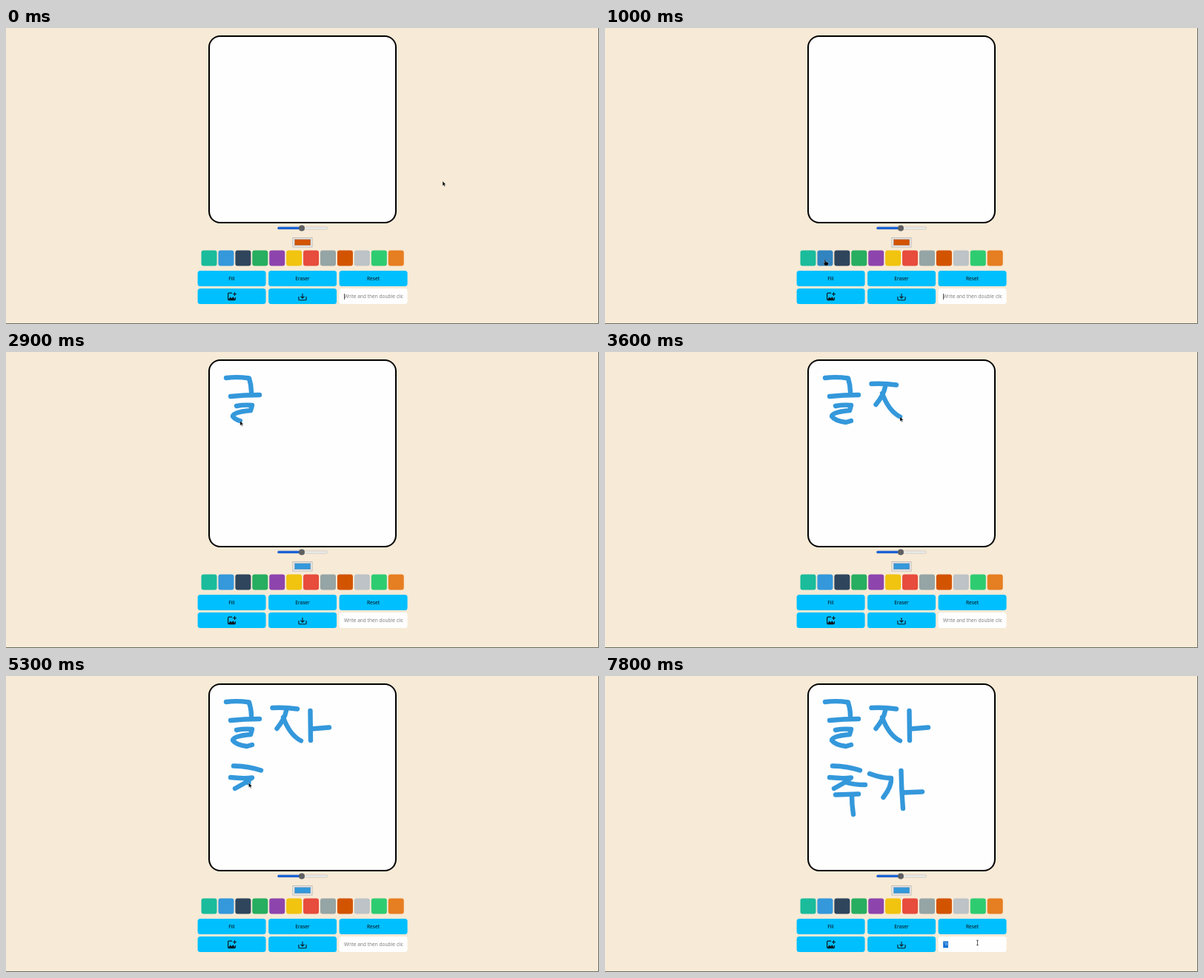
Animation of 800x400 px, one loop 8 s. Source, as an HTML page:

```html
<!DOCTYPE html>
<html lang="en">
<head>
<meta charset="utf-8">
<title>Paint board</title>
<style>
html, body { margin: 0; height: 100%; overflow: hidden; background: #f7ead6; }
svg { display: block; width: 800px; height: 400px; }
text { font: 6.6px "Open Sans", "Noto Sans", sans-serif; }
.mid { text-anchor: middle; }
#ink path { fill: none; stroke: #3498db; stroke-width: 6.4; stroke-linecap: round; stroke-linejoin: round; }
</style>
</head>
<body>
<svg viewBox="0 0 800 400">
  <path d="M799.5 0V399.5H0" fill="none" stroke="#666a60"/>
  <rect x="274" y="11" width="252" height="252" rx="15" fill="#fefefe" stroke="#000" stroke-width="2"/>
  <g id="ink"></g>

  <rect x="366.5" y="269" width="67" height="3" rx="1.5" fill="#efefef" stroke="#b5b5b2" stroke-width=".6"/>
  <rect x="366.3" y="268.8" width="33" height="3.2" rx="1.6" fill="#1a62d6"/>
  <circle cx="399" cy="270.5" r="4" fill="#5f6062"/>

  <rect x="387" y="283.5" width="26" height="12.5" fill="#f1f0ef" stroke="#b0b0b0" stroke-width=".8"/>
  <rect id="picked" x="389.3" y="285.6" width="21.6" height="8.2" stroke="#888" stroke-width=".4"/>

  <g id="swatches"></g>
  <g id="buttons" fill="#00bfff"></g>
  <g class="mid">
    <text x="304.5" y="341">Fill</text>
    <text x="400" y="341">Eraser</text>
    <text x="495.5" y="341">Reset</text>
  </g>
  <g fill="none" stroke="#0b1a22" stroke-width="1.2">
    <path d="M305 358.2h-4.2q-1.2 0-1.2 1.2v7q0 1.2 1.2 1.2h7.4q1.2 0 1.2-1.2V364M308.5 357v5M306 359.5h5"/>
    <path d="M300 367l2.6-3.6 1.8 1.8 2-2 2.8 3.8z" fill="#0b1a22" stroke="none"/>
    <path d="M394.9 363v3.4q0 1.3 1.3 1.3h7.6q1.3 0 1.3-1.3V363M400 359v5.8M397.5 362.6l2.5 2.5 2.5-2.5" stroke-width="1.1"/>
  </g>

  <clipPath id="field"><rect x="455" y="354" width="80.5" height="18"/></clipPath>
  <text id="hint" x="456" y="365.3" fill="#777" clip-path="url(#field)">Write and then double click</text>
  <path id="caret" d="M456.6 359v8" stroke="#222" stroke-width=".8"/>
  <g id="typed">
    <rect x="456.2" y="358.5" width="6.8" height="8.8" fill="#0a6fd2"/>
    <text x="459.6" y="365.3" class="mid" fill="#fff" style="font-family:'Noto Sans CJK KR','Noto Sans CJK',sans-serif">ㄲ</text>
  </g>

  <g id="pointer">
    <path id="arrow" d="M0 0v6.3l1.5-1.4 1 2.3 1-.4-1-2.2h2z" stroke="#fff" stroke-width=".3"/>
    <path id="hand" d="M-.8.6Q0-.6.7.6V3l3 .8q.7.3.6 1.2L3.6 8H-.3L-2.6 5q.3-1 1.8 0z" stroke="#dde" stroke-width=".3"/>
    <path id="beam" d="M-1.4-3.2h2.8M0-3.2v6.4M-1.4 3.2h2.8" fill="none" stroke="#333" stroke-width=".8"/>
  </g>
</svg>
<script>
const $ = id => document.getElementById(id);
const blue = '#3498db', rust = '#d35400';
const colors = ['#1abc9c', blue, '#2f455c', '#27ae60', '#8e44ad', '#f1c40f',
  '#e74c3c', '#95a5a6', rust, '#bdc3c7', '#2ecc71', '#e67e22'];

function add(parent, name, attrs) {
  const el = document.createElementNS('http://www.w3.org/2000/svg', name);
  for (const key in attrs) el.setAttribute(key, attrs[key]);
  return $(parent).appendChild(el);
}

const swatches = colors.map((fill, i) =>
  add('swatches', 'rect', { x: 263.5 + 22.93 * i, y: 300.4, width: 21, height: 21, rx: 3, fill }));
for (let i = 0; i < 6; i++) {
  add('buttons', 'rect', { x: 258.6 + 95.5 * (i % 3), y: i < 3 ? 328 : 352,
    width: 92, height: 21, rx: 3.5, fill: i === 5 ? '#fefefe' : '#00bfff' });
}

// Start, end and path of the pointer; a path with a line leaves ink
const moves = [
  [0, 50, 'M589 207'],
  [900, 1200, 'M297 313'],
  [1800, 2100, 'M297 35Q312 33 328 35.5Q331 45 331 54'],
  [2200, 2400, 'M303 60Q322 58 342 58'],
  [2500, 3000, 'M311 73Q322 71 332 72L330 79Q306 81 306 87Q310 93 325 95L332 93'],
  [3100, 3250, 'M359.500 43Q376 42 393 44.500'],
  [3300, 3400, 'M378 47Q376 58 365.500 71'],
  [3450, 3600, 'M374 56Q383 80 398 87.500'],
  [3700, 3900, 'M410.500 47L411 87'],
  [4000, 4200, 'M412 71.500L436 69.500'],
  [4300, 4300, 'M406 98.500'],
  [4600, 4800, 'M307 121.500Q328 122 344 127.500'],
  [4900, 5200, 'M303 137Q320 139 332 137.500Q321 146 309 152'],
  [5290, 5450, 'M326 144Q336 147 351 147'],
  [5550, 5650, 'M311 160.500L342 159.500'],
  [5700, 5850, 'M333 161Q333 174 335 187'],
  [5950, 6200, 'M357 132Q373 138 386 138Q387 149 375.500 164'],
  [6300, 6450, 'M399.500 128Q400 155 402 179'],
  [6600, 6750, 'M403 157.500L428 156.500'],
  [7200, 7200, 'M512 331'],
  [7400, 8000, 'M502.500 360.500']
].map(([from, to, d]) => {
  const n = d.match(/[\d.]+/g).map(Number);
  const path = n.length > 2 ? add('ink', 'path', { d }) : null;
  return { from, to, path, length: path ? path.getTotalLength() : 0,
    first: n.slice(0, 2), last: n.slice(-2) };
});

function pointerAt(t) {
  const i = moves.findLastIndex(m => m.from <= t), m = moves[i], next = moves[i + 1];
  if (t <= m.to || !next) {
    if (!m.path) return m.first;
    const p = m.path.getPointAtLength(m.length * (t - m.from) / (m.to - m.from));
    return [p.x, p.y];
  }
  const u = (t - m.to) / (next.from - m.to), k = u * u * (3 - 2 * u);
  return m.last.map((v, j) => v + (next.first[j] - v) * k);
}

const show = (el, on) => { el.style.display = on ? '' : 'none'; };

function draw(t) {
  for (const m of moves) {
    if (!m.path) continue;
    const p = Math.min(1, (t - m.from) / (m.to - m.from));
    show(m.path, p >= 0);
    if (p < 1) m.path.style.strokeDasharray = `${Math.max(.01, p * m.length)} 999`;
    else m.path.style.strokeDasharray = 'none';
  }
  const hover = t >= 900 && t <= 1200, inField = t >= 7300, typed = t >= 7800;
  $('pointer').setAttribute('transform', `translate(${pointerAt(t)})`);
  show($('hand'), hover);
  show($('beam'), inField);
  show($('arrow'), !hover && !inField);
  swatches[1].setAttribute('fill', hover ? '#3184c0' : blue);
  $('picked').setAttribute('fill', t > 1100 ? blue : rust);
  show($('caret'), t <= 1100 ? t % 1000 < 500 : t >= 7400 && !typed);
  show($('hint'), !typed);
  show($('typed'), typed);
}

function tick(now) {
  draw(Math.floor(now % 8000 / 100) * 100);
  requestAnimationFrame(tick);
}
draw(0);
requestAnimationFrame(tick);
</script>
</body>
</html>
```
